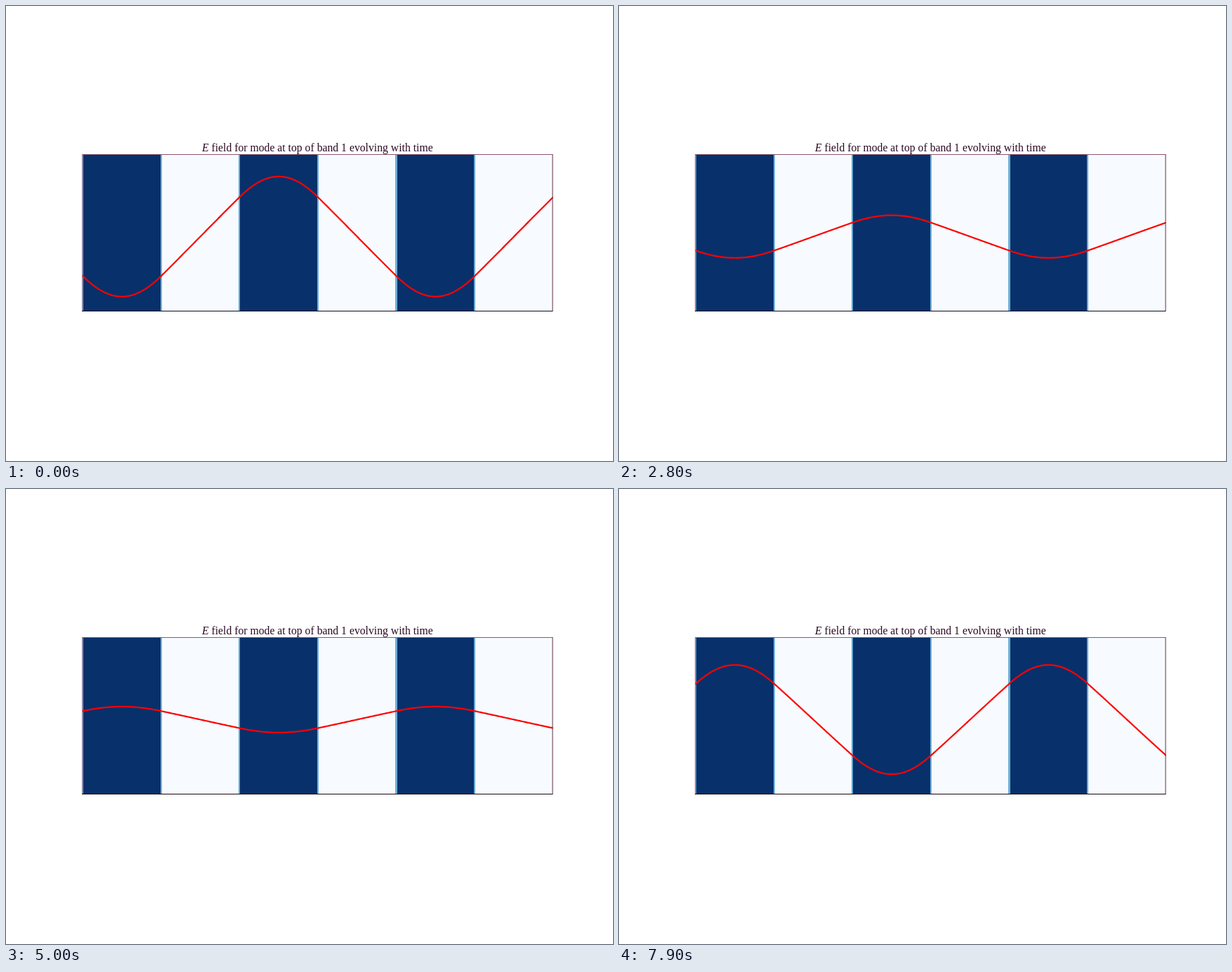
Write an HTML page with a canvas that moves like this. It is 864x648 px and loops after 8 s.

```html
<!DOCTYPE html>
<html lang="en">
<head>
<meta charset="utf-8">
<title>Field mode</title>
<style>
html, body { margin: 0; width: 100%; height: 100%; overflow: hidden; background: #fff; }
canvas { display: block; }
</style>
</head>
<body>
<canvas id="stage" width="864" height="648"></canvas>
<script>
const ctx = document.getElementById('stage').getContext('2d');
const LOOP = 8000, STEP = 100;
const box = { left: 108, right: 778, top: 211, bottom: 434 };
const layer = 111.6;          // thickness of one slab
const edge = 2.23;            // soft column where slabs meet
const midY = 328.4;
const shift = 1.2;            // half a sample to the right

// Standing wave: cosine in the dense slabs, sine in the light ones.
const kDense = 0.854, kLight = kDense / Math.sqrt(13);

function mode(x) {
  const u = (x - box.left - shift) / layer;
  const n = Math.floor(u);
  const d = (u - n - 0.5) * 2;
  const sign = Math.floor(n / 2) % 2 ? 1 : -1;
  if (n % 2 === 0) return sign * Math.cos(kDense * d);
  return -sign * Math.cos(kDense) * Math.sin(kLight * d) / Math.sin(kLight);
}

function fill(color, x0, y0, x1, y1) {
  ctx.fillStyle = color;
  ctx.fillRect(x0, y0, x1 - x0, y1 - y0);
}

function drawSlabs() {
  for (let i = 0; i < 6; i++) {
    const x = box.left + i * layer;
    const a = Math.round(x), b = Math.round(x + edge);
    fill(i % 2 ? '#f7fbff' : '#08306b', b, box.top, Math.round(x + layer), box.bottom);
    fill('#6baed6', a, box.top, b, box.bottom);
  }
}

function drawWave(step) {
  const amp = 130.7 * Math.sin(0.0171 * (41.7 - step));
  ctx.save();
  ctx.beginPath();
  ctx.rect(box.left, box.top, box.right - box.left + 0.5, box.bottom - box.top);
  ctx.clip();
  ctx.beginPath();
  // Start just past the phase origin; the even cosine covers the left margin.
  for (let x = box.left; x <= box.right + 1; x += 1) {
    const px = x < box.left + shift ? 2 * (box.left + shift + layer / 2) - x : x;
    const v = x < box.left + shift
      ? -Math.cos(kDense * (px - box.left - shift - layer / 2) * 2 / layer)
      : mode(x);
    ctx.lineTo(x, midY - amp * v);
  }
  ctx.strokeStyle = '#f00';
  ctx.lineWidth = 2.2;
  ctx.lineJoin = 'round';
  ctx.stroke();
  ctx.restore();
}

function drawFrame() {
  const { left, right, top, bottom } = box;
  fill('#8c566c', left, top, right, top + 1);
  fill('#a5708c', left, top, left + 1, bottom);
  fill('#5f3048', right - 0.5, top, right + 0.5, bottom);
  fill('#160a14', left, bottom, right + 0.5, bottom + 1);
}

function drawTitle() {
  const rest = ' field for mode at top of band 1 evolving with time';
  const size = '15.73px "Liberation Serif", serif';
  ctx.fillStyle = '#2a0a24';
  ctx.textBaseline = 'alphabetic';
  ctx.font = 'italic ' + size;
  const w = ctx.measureText('E').width;
  ctx.font = size;
  const x = 443.3 - (w + ctx.measureText(rest).width) / 2;
  ctx.fillText(rest, x + w, 206.5);
  ctx.font = 'italic ' + size;
  ctx.fillText('E', x, 206.5);
}

function draw(ms) {
  fill('#fff', 0, 0, 864, 648);
  drawSlabs();
  drawWave(Math.floor((ms % LOOP) / STEP));
  drawFrame();
  drawTitle();
}

const start = performance.now();
function tick() {
  draw(performance.now() - start);
  requestAnimationFrame(tick);
}
tick();
</script>
</body>
</html>
```
